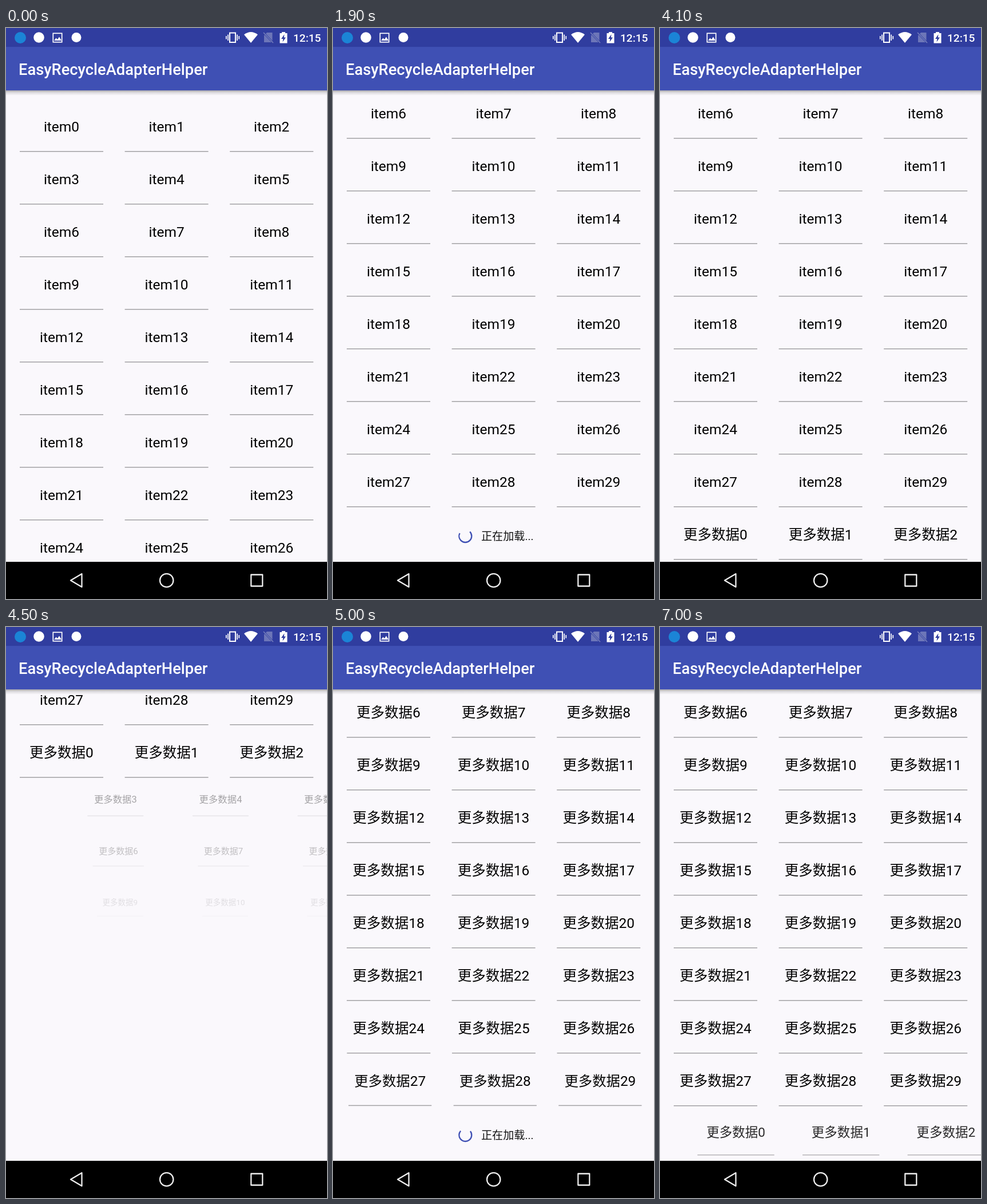
An HTML page with a canvas for the animation above (7100 ms loop, 561 by 998 pixels).

```html
<!DOCTYPE html>
<html lang="zh-CN">
<head>
<meta charset="utf-8">
<title>Recycler list</title>
<style>
html, body { margin: 0; width: 100%; height: 100%; overflow: hidden; background: #000; }
canvas { display: block; }
</style>
</head>
<body>
<canvas id="stage" width="561" height="998"></canvas>
<script>
const g = document.getElementById('stage').getContext('2d');
const LOOP = 7100, STEP = 100, ROW = 92, FADE = 400;
const FONT = 'Roboto, "Noto Sans CJK SC", "Noto Sans CJK", sans-serif';
const STATUS = '#303d9f', BAR = '#3f50b4', PAPER = '#faf8fc';

function text(str, x, y, size, color, weight = 400, align = 'left') {
  g.font = `${weight} ${size}px ${FONT}`;
  g.textAlign = align;
  g.fillStyle = color;
  g.fillText(str, x, y);
}

function box(x, y, w, h, color) {
  g.fillStyle = color;
  g.fillRect(x, y, w, h);
}

function disc(x, y, r, color) {
  g.fillStyle = color;
  g.beginPath();
  g.arc(x, y, r, 0, Math.PI * 2);
  g.fill();
}

function poly(points, color) {
  g.fillStyle = color;
  g.beginPath();
  points.forEach(p => g.lineTo(...p));
  g.closePath();
  g.fill();
}

function scrollAt(t) {
  if (t < 1500) return 0;
  if (t < 1600) return 133;
  if (t < 4400) return 207;
  if (t < 4500) return 430;
  if (t < 4600) return 873;
  return 1127;
}

// Time at which a row starts to slide in
function rowStart(row) {
  if (row < 9) return -FADE;
  if (row === 9) return 1500;
  if (row === 10) return 3640;
  if (row < 20) return 4425 + 27 * (row - 11);
  return 6760;
}

function drawRow(row, y, t) {
  const p = Math.min(1, (t - rowStart(row)) / FADE);
  if (p <= 0) return;
  const shift = 51.5 * (1 + Math.cos(Math.PI * p));
  const ease = 1 - (1 - p) ** 2;
  for (let col = 0; col < 3; col++) {
    const n = row * 3 + col;
    g.save();
    g.globalAlpha = ease;
    g.translate(97 + 183.6 * col + shift, y - 31);
    g.scale(0.5 + ease / 2, 0.5 + ease / 2);
    text((row < 10 ? 'item' : '更多数据') + n % 30, 0, 40, 24.5, '#000', 400, 'center');
    box(-73, 74, 146, 1.5, '#a2a1a4');
    g.restore();
  }
}

const swift = x => {
  x = Math.max(0, Math.min(1, x));
  return 1 - (1 - x ** 1.6) ** 3;
};

function drawLoader(y, age) {
  const phase = age / 1333 % 1;
  const turn = age / 6665 * 2 + phase / 4 - 0.35;
  const from = turn + 0.75 * swift(phase * 2 - 1);
  const to = turn + 0.75 * swift(phase * 2);
  g.strokeStyle = BAR;
  g.lineWidth = 2.3;
  g.beginPath();
  g.arc(231.3, y, 11, from * Math.PI * 2, (to + 0.01) * Math.PI * 2);
  g.stroke();
  text('正在加载...', 259, y + 7, 19.1, '#111');
}

function drawStatus() {
  box(0, 0, 561, 33, STATUS);
  disc(25, 17, 10, '#1b84d6');
  disc(57.5, 16.5, 9.3, '#fff');
  disc(123, 16.5, 8.5, '#fff');

  g.strokeStyle = '#fff';
  g.lineWidth = 1.7;
  g.strokeRect(82.3, 9.3, 15.4, 15.4);
  poly([[84, 22], [87.5, 17.5], [90, 20], [93, 15.5], [97, 22]], '#fff');

  g.lineWidth = 2;
  g.strokeRect(391, 8.5, 10, 16.5);
  for (const side of [-1, 1]) {
    box(395.2 + side * 8, 11.5, 1.7, 10.5, '#fff');
    box(395.2 + side * 11.2, 14, 1.7, 5.5, '#fff');
  }

  g.fillStyle = '#fff';
  g.beginPath();
  g.moveTo(428, 26);
  g.lineTo(416, 11.5);
  g.quadraticCurveTo(428, 2.5, 440, 11.5);
  g.fill();

  poly([[456, 8], [465.5, 8], [465.5, 25], [451, 25], [451, 13]], '#6d76b8');
  g.lineWidth = 3;
  g.strokeStyle = STATUS;
  g.beginPath();
  g.moveTo(450, 8);
  g.lineTo(467, 26);
  g.stroke();
  g.lineWidth = 1.5;
  g.strokeStyle = '#7780bd';
  g.stroke();

  box(478.5, 9, 13, 17.5, '#fff');
  box(482, 7, 6, 3, '#fff');
  poly([[486.5, 11], [481, 19], [484.3, 19], [483.5, 24.5], [489, 16.5], [485.8, 16.5]], STATUS);
  text('12:15', 502, 24, 19.1, '#fff', 500);
}

function drawNav() {
  box(0, 933, 561, 65, '#000');
  g.strokeStyle = '#eee';
  g.lineWidth = 2.3;
  g.lineJoin = 'round';
  g.beginPath();
  g.moveTo(113, 965.5);
  g.lineTo(132.5, 954);
  g.lineTo(132.5, 977);
  g.closePath();
  g.stroke();
  g.beginPath();
  g.arc(280.7, 965.5, 11.7, 0, Math.PI * 2);
  g.stroke();
  g.strokeRect(428.3, 955.5, 20, 20);
  g.lineJoin = 'miter';
}

function draw(t) {
  const scroll = scrollAt(t);
  box(0, 0, 561, 998, PAPER);
  for (let row = 0; row <= 20; row++) {
    const y = 172 + row * ROW - scroll;
    if (y > 60 && y < 970) drawRow(row, y, t);
  }
  if (t < 3700) drawLoader(1095 - scroll, Math.max(0, t - 1433));
  else if (t > 4500 && t < 6800) drawLoader(2015 - scroll, t - 4500);

  const shade = g.createLinearGradient(0, 109, 0, 118);
  shade.addColorStop(0, 'rgba(0,0,0,.32)');
  shade.addColorStop(0.4, 'rgba(0,0,0,.12)');
  shade.addColorStop(1, 'rgba(0,0,0,0)');
  box(0, 109, 561, 9, shade);
  box(0, 33, 561, 76, BAR);
  text('EasyRecycleAdapterHelper', 22, 81.5, 27.3, '#fff', 500);
  drawStatus();
  drawNav();
}

// The screen refreshes ten times a second
const begin = performance.now();
function tick() {
  const t = (performance.now() - begin) % LOOP;
  draw(Math.floor(t / STEP) * STEP);
  requestAnimationFrame(tick);
}
tick();
</script>
</body>
</html>
```
